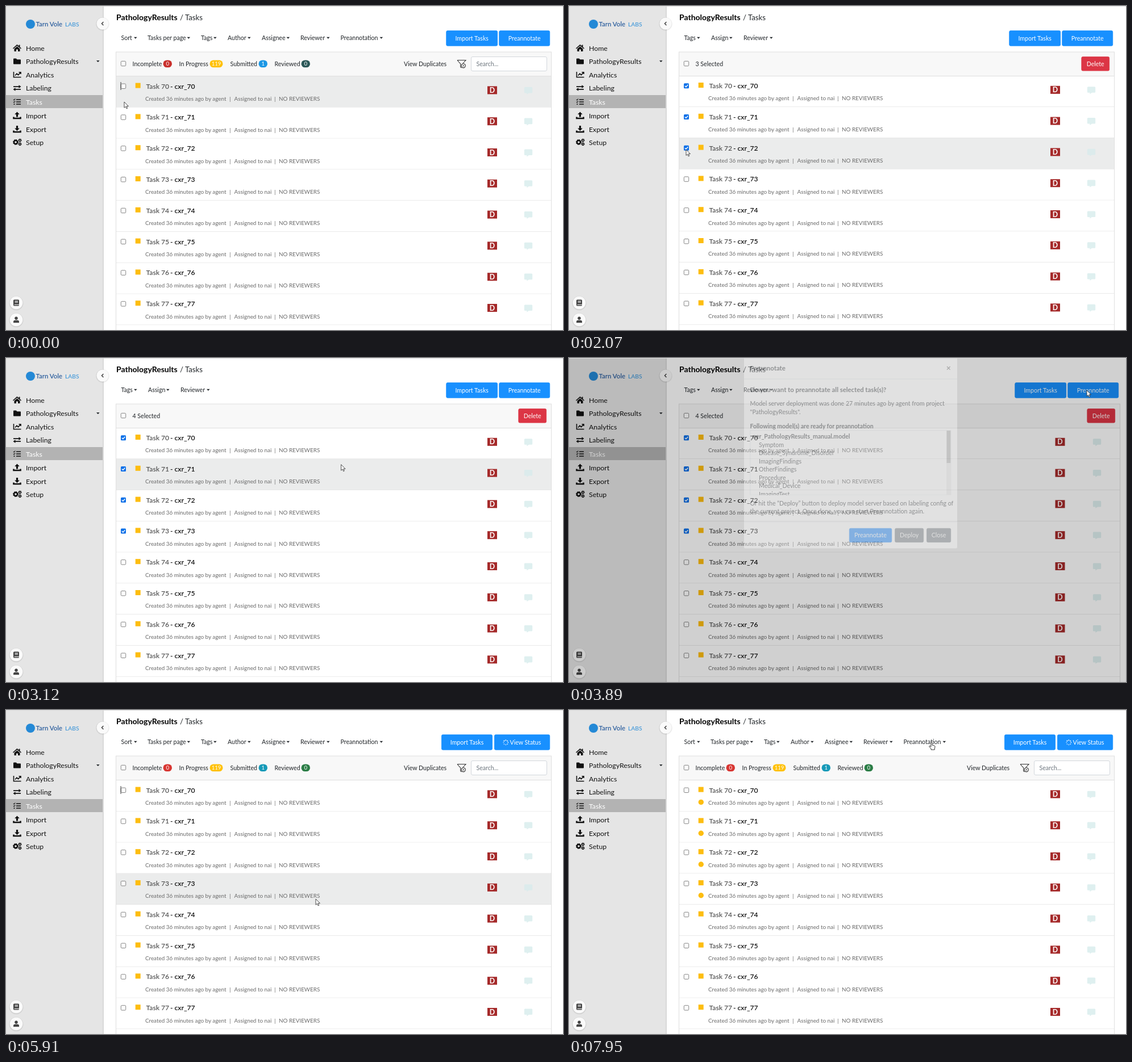
An HTML page that plays this animation: 980 by 571 pixels, repeating every 8000 ms.

```html
<!DOCTYPE html>
<html lang="en">
<head>
<meta charset="utf-8">
<title>Task list</title>
<style>
  html, body { margin: 0; width: 100%; height: 100%; overflow: hidden; background: #fff; }
  svg { display: block; width: 980px; height: 571px; font-family: Lato, sans-serif; }
  text { white-space: pre; }
</style>
</head>
<body>
<svg id="stage" viewBox="0 0 980 571"></svg>
<script>
const LOOP = 8000;
const PROJECT = 'PathologyResults';
const CLICKS = [450, 1120, 1880, 2620];      // one checkbox each
const MODAL_OPEN = 3830, MODAL_CLOSE = 5770, LIST_RELOAD = 5860, DOTS_SHOWN = 6900;
const ROW_H = 54.8;

// time, x, y of the pointer tip
const POINTER = [
  [0, 208, 169], [70, 208, 169], [350, 206, 143], [650, 206, 143], [950, 206, 198],
  [1300, 206, 198], [1600, 206, 253], [2150, 206, 253], [2400, 206, 308], [2700, 206, 308],
  [2900, 400, 255], [3120, 589, 188], [3400, 760, 120], [3720, 911, 57], [4250, 911, 57],
  [4700, 760, 140], [5020, 570, 279], [5090, 561, 304], [5230, 545, 333], [6250, 545, 333],
  [6600, 565, 310], [7000, 576, 272], [7240, 592, 240], [7310, 597, 226], [7650, 632, 84],
  [7850, 638, 57], [8000, 638, 57]
];

const clamp = v => Math.max(0, Math.min(1, v));

function pointerAt(t) {
  const i = Math.max(1, POINTER.findIndex(p => p[0] >= t));
  const [t0, x0, y0] = POINTER[i - 1], [t1, x1, y1] = POINTER[i];
  const k = clamp((t - t0) / (t1 - t0));
  return { x: x0 + (x1 - x0) * k, y: y0 + (y1 - y0) * k };
}

// drawing helpers; text is placed by the middle of its capitals
const text = (x, mid, str, size = 10.6, fill = '#212529', weight = 400, anchor = 'start') =>
  `<text x="${x}" y="${mid + size * 0.36}" font-size="${size}" fill="${fill}" font-weight="${weight}" text-anchor="${anchor}">${str}</text>`;
const rect = (x, y, w, h, fill, r = 0, more = '') =>
  `<rect x="${x}" y="${y}" width="${w}" height="${h}" rx="${r}" fill="${fill}" ${more}/>`;
const circle = (x, y, r, fill, more = '') => `<circle cx="${x}" cy="${y}" r="${r}" fill="${fill}" ${more}/>`;
const path = (d, fill, more = '') => `<path d="${d}" fill="${fill}" ${more}/>`;
const line = (d, color, width = 1) => path(d, 'none', `stroke="${color}" stroke-width="${width}"`);
const at = (x, y, content, more = '') => `<g transform="translate(${x} ${y})" ${more}>${content}</g>`;
const caret = (x, y) => path(`M${x} ${y - 1.5}h5.6l-2.8 3z`, '#212529');
const buttonBox = (x, y, w, h, fill) => rect(x, y, w, h, fill, 2.2, `stroke="${fill}" stroke-width=".8"`);
const button = (x, y, w, h, label, fill) =>
  buttonBox(x, y, w, h, fill) + text(x + w / 2, y + h / 2 + 0.2, label, 10.6, '#fff', 400, 'middle');
const pill = (x, w, label, fill, color = '#fff') =>
  rect(x, 95.5, w, 12.8, fill, 6.4) + text(x + w / 2, 102, label, 9.6, color, 400, 'middle');
const checkbox = (x, y, on) => on
  ? rect(x - 4.5, y - 4.5, 9, 9, '#0b70e8', 1.5) + line(`M${x - 2.6} ${y}l2 2 3.4-4`, '#fff', 1.4)
  : rect(x - 4.2, y - 4.2, 8.4, 8.4, '#fff', 1.5, 'stroke="#767676" stroke-width=".9"');

function gear(x, y, r) {
  return circle(x, y, r * 0.72, 'none', `stroke="#111" stroke-width="${r * 0.6}"`) +
    circle(x, y, r, 'none', `stroke="#111" stroke-width="1.3" stroke-dasharray="${r * 0.393}"`);
}

const tray = line('M-6 2.5V5H6V2.5', '#111', 2.6);
const NAV = [
  ['Home', 74, path('M-7.5 .5L0-6.2 3-3.5V-5.5H5v3.7L7.5.5 6.5 1.5 0-4-6.5 1.5zM-5 1.5L0-2.7 5 1.5V6H1.5V2.5h-3V6H-5z', '#111')],
  [PROJECT, 97.5, path('M-6.5-4q0-1 1-1h3.8L0-3.3h5.5q1 0 1 1V4q0 1-1 1h-11q-1 0-1-1z', '#111')],
  ['Analytics', 121, line('M-6-5V4.5H7M-3.5 1.5L-.5-1.8 2 .5 6-3.8M3-4.3h3.5V-1', '#111', 1.6)],
  ['Labeling', 144.5, line('M-6.5-2.4H4M6.5 2.4H-4', '#111', 1.7) + path('M3-5.2l4 2.8-4 2.8zM-3-.4l-4 2.8 4 2.8z', '#111')],
  ['Tasks', 169, line('M-1.5-4H6.5M-1.5 0H6.5M-1.5 4H6.5', '#111', 1.6) +
    line('M-6.5-4.2l1.2 1.2 2-2.4M-6.5-.2l1.2 1.2 2-2.4', '#111', 1.1) + circle(-5, 4, 1.1, '#111')],
  ['Import', 193, tray + path('M0-6.5l4.3 4.5H1.6V2.5h-3.2V-2h-2.7z', '#111')],
  ['Export', 217, tray + path('M0 3l4.3-4.5H1.6V-6h-3.2v4.5h-2.7z', '#111')],
  ['Setup', 240, gear(-2.5, 0, 4.3) + gear(5, -3.3, 2.4) + gear(5, 3.3, 2.4)]
];

const floating = (x, y, r, icon) => circle(x, y + 0.8, r + 1.2, '#000', 'opacity=".08"') +
  circle(x, y, r, '#fafafa') + at(x, y, icon);

function sidebar() {
  return rect(0, 0, 171, 571, '#e5e5e5') + rect(170.5, 0, 1.2, 571, '#cbcbcb') +
    circle(43, 32, 8, '#2489d6') +
    text(52.5, 32.2, 'Tarn Vole', 11.4, '#2d5f9e', 600) + text(104, 32.2, 'LABS', 10.3, '#2d8fd8') +
    rect(0, 157, 170, 23, '#b3b3b3') +
    NAV.map(([label, y, icon]) => at(19.5, y, icon) +
      text(35, y + 0.2, label, 12.3, label === 'Tasks' ? '#fff' : '#111')).join('') +
    caret(159, 97.5) +
    floating(170, 31, 10.5, line('M1.4-3L-1.6 0l3 3', '#333', 1.3)) +
    floating(18, 523, 11.3, rect(-5, -5.5, 10, 11, '#444', 1.5) + line('M-2.5-2.8H3M-2.5-.8H3M-3.5 3.3H5', '#fff', 1)) +
    floating(18, 553, 11.3, circle(0, -2.8, 2.7, '#444') + path('M-5 5.3V3.6Q-5 .8-2 .8H2Q5 .8 5 3.6V5.3z', '#444'));
}

function toolbar(selecting, reloaded, dx, t) {
  const menus = selecting
    ? [['Tags', 202.5, 225], ['Assign', 250, 282], ['Reviewer', 307, 353]]
    : [['Sort', 202.5, 225], ['Tasks per page', 249, 318.5], ['Tags', 343, 365], ['Author', 390, 425],
       ['Assignee', 450, 493.5], ['Reviewer', 518, 564], ['Preannotation', 588.5, 657.5]];
  let out = text(194, 20, PROJECT, 14, '#000', 700) + text(306, 20, '/ Tasks', 13.2) +
    menus.map(([label, x, cx]) => text(x, 56, label) + caret(cx, 56.3)).join('');
  if (!reloaded) return out + button(774.7 + dx, 43.6, 90, 26.6, 'Import Tasks', '#1890ff') +
    button(867.7 + dx, 43.6, 89, 26.6, 'Preannotate', '#1890ff');
  const turn = Math.floor(t / 125) * 45;
  return out + button(766.4, 43.6, 89.2, 26.6, 'Import Tasks', '#1890ff') + buttonBox(859.4, 43.6, 97.3, 26.6, '#1890ff') +
    text(886.5, 57.1, 'View Status', 10.6, '#fff') +
    at(879.3, 57.3, [...Array(8).keys()].map(i =>
      circle(0, -4, 1.05, '#fff', `transform="rotate(${i * 45 + turn})" opacity="${1 - i * 0.07}"`)).join(''));
}

function panelHeader(count, selecting, reloaded, dx) {
  const frame = rect(193.5, 81, 766 + dx, 42.5, '#f8f8f8', 0, 'stroke="#dfdfdf" stroke-width="1"') + checkbox(206.5, 101.5, false);
  if (selecting) return frame + text(222.5, 101.7, count + ' Selected') + button(901.8 + dx, 89.5, 48.8, 24.6, 'Delete', '#dc3545');
  return frame +
    text(222.5, 101.7, 'Incomplete') + pill(276.5, 15.5, '0', reloaded ? '#d83632' : '#c9302c') +
    text(304.5, 101.7, 'In Progress') + pill(358.5, 23, '119', '#ffc107') +
    text(394.5, 101.7, 'Submitted') + pill(444.5, 15.5, '1', reloaded ? '#179ab8' : '#1b97e5') +
    text(472.5, 101.7, 'Reviewed') + pill(519.5, 15.5, '0', reloaded ? '#2b7d46' : '#2c5858') +
    text(700, 101.7, 'View Duplicates') +
    line('M794 95.5H809L803.5 101.5M794 95.5L799.7 102V107.5L801.5 109', '#333', 1.1) +
    circle(804.8, 105.3, 3.6, '#f8f8f8', 'stroke="#333" stroke-width="1.1"') + line('M803.3 103.8l3 3m0-3l-3 3', '#333', 0.8) +
    rect(818.5, 89.5, 133, 25, '#fff', 2.5, 'stroke="#ced4da" stroke-width=".9"') + text(827.5, 101.8, 'Search...', 10.6, '#6c757d');
}

function row(i, checked, hovered, dotted, dx) {
  const gray = '#6a6a6a';
  return rect(194, 0, 765.5 + dx, ROW_H, hovered ? '#ebecec' : '#fff') +
    rect(194, ROW_H - 0.6, 765.5 + dx, 0.9, '#dedede') +
    checkbox(206.5, 17.5, checked) + rect(227.7, 11.8, 9, 9, '#fdbd10') +
    text(246.5, 17.4, `Task 7${i}`, 12.1, '#555', 600) + text(289, 17.4, `- cxr_7${i}`, 12.1, '#111', 600) +
    text(245, 39.6, 'Created 36 minutes ago by agent', 9.85, gray) + text(393, 39.6, '|', 9.85, gray) +
    text(401.5, 39.6, 'Assigned to nai', 9.85, gray) + text(472, 39.6, '|', 9.85, gray) +
    text(480, 39.6, 'NO REVIEWERS', 9.85, gray) +
    (dotted ? circle(232.3, 38.6, 4.7, '#fdbd10') : '') +
    rect(847 + dx * 0.85, 17.6, 17, 14, '#a52a2a') + text(855.5 + dx * 0.85, 24.7, 'D', 12.3, '#fff', 700, 'middle') +
    at(919 + dx, 25, path('M-7.2-4.5q0-1.5 1.5-1.5H5.7q1.5 0 1.5 1.5V3.1Q7.2 4.6 5.7 4.6H1L-2.7 7V4.6h-3q-1.5 0-1.5-1.5z', hovered ? '#dcebec' : '#dff0f0'));
}

function modal(hot) {
  const labels = ['Symptom', 'Disease_Syndrome_Disorder', 'ImagingFindings', 'OtherFindings', 'Procedure', 'Medical_Device', 'ImagingTest'];
  return rect(308, 20, 375, 336.4, '#fff', 2.5) +
    text(318.5, 38.8, 'Preannotate', 11.4, '#212529', 700) + line('M665 36l5.6 5.6m0-5.6l-5.6 5.6', '#666', 1.3) +
    rect(308, 57.5, 375, 0.9, '#dee2e6') +
    text(318.5, 76.8, 'Do you want to preannotate all selected task(s)?', 11.3, '#212529', 700) +
    text(318.5, 101.2, 'Model server deployment was done 27 minutes ago by agent from project') +
    text(318.5, 115.7, `"${PROJECT}".`) +
    text(318.5, 140.7, 'Following model(s) are ready for preannotation', 10.5, '#212529', 700) +
    '<clipPath id="list"><rect x="318" y="148" width="355" height="114.5"/></clipPath><g clip-path="url(#list)">' +
    rect(318.8, 148.6, 353, 113.6, '#fff', 0, 'stroke="#dee2e6" stroke-width=".9"') +
    text(323, 159.4, `ner_${PROJECT}_manual.model`, 10.5, '#212529', 700) +
    labels.map((label, i) => text(334, 174 + i * 14.45, label)).join('') +
    rect(664, 149, 7.6, 113, '#ececec') + rect(664.5, 149, 6.8, 57, '#adadad') + '</g>' +
    text(318.5, 277, 'Or hit the “Deploy” button to deploy model server based on labeling config of') +
    text(318.5, 291.5, 'the current project. Once done, you can start Preannotation again.') +
    rect(308, 309.3, 375, 0.9, '#dee2e6') +
    button(493.3, 321.2, 74.4, 24.4, 'Preannotate', hot ? '#0069d9' : '#007bff') +
    button(573.6, 321.2, 50, 24.4, 'Deploy', '#6c757d') + button(629.5, 321.2, 42.2, 24.4, 'Close', '#6c757d');
}

const ARROW = path('M0 0V10.4L2.4 8.2 4.1 11.9 5.7 11.2 4.1 7.6H7.4z', '#fff', 'stroke="#222" stroke-width=".8"');
const HAND = path('M-1.1 1a1.1 1.1 0 0 1 2.2 0V5l3.5.8q1.6.4 1.4 2.2L5.2 11v2H-1v-1.8L-4.2 7.5q-.2-1.6 1.2-1.3l1.9 1.6z',
  '#fff', 'stroke="#222" stroke-width=".9"');

function scene(t) {
  const count = t < LIST_RELOAD ? CLICKS.filter(c => t >= c).length : 0;
  const selecting = count > 0, reloaded = t >= LIST_RELOAD;
  const modalUp = t >= MODAL_OPEN && !reloaded;
  const dx = modalUp ? 10 : 0;
  const pointer = pointerAt(t), trail = pointerAt(Math.max(0, t - 70));
  const top = selecting ? 123.2 : 123.8;
  const hovered = modalUp ? -1 : Math.floor((trail.y - top) / ROW_H);
  const overButton = modalUp ? pointer.y > 321 : pointer.y > 46 && pointer.y < 70;

  let out = rect(0, 0, 980, 571, '#fff') + toolbar(selecting, reloaded, dx, t);
  for (let i = 0; i < 9; i++)
    out += at(0, top + i * ROW_H, row(i, i < count, i === hovered, t >= DOTS_SHOWN && i < 4, dx));
  out += panelHeader(count, selecting, reloaded, dx) +
    line(`M193.5 123V571M${959.5 + dx} 123V571`, '#dfdfdf');
  const blinkStart = reloaded ? LIST_RELOAD - 10 : 0;
  if (!selecting && (t - blinkStart) % 1060 < 530) out += rect(201.6, 134, 0.9, 14, '#222');
  out += sidebar();

  if (modalUp) {
    const rise = clamp((t - MODAL_OPEN) / 300);
    const shown = (1 - (1 - rise) ** 2) * (1 - clamp((t - MODAL_CLOSE) / 110));
    out += rect(0, 0, 980, 571, '#000', 0, `opacity="${shown * 0.5}"`) +
      at(0, (shown - 1) * 33, modal(overButton), `opacity="${shown}"`);
  }
  // the window edge stays undimmed
  return out + rect(0, 0, 980, 1, '#dedede') + at(pointer.x, pointer.y, overButton ? HAND : ARROW);
}

const stage = document.getElementById('stage');
let shownScene = '';
function tick() {
  const next = scene(performance.now() % LOOP);
  if (next !== shownScene) stage.innerHTML = shownScene = next;
  requestAnimationFrame(tick);
}
tick();
</script>
</body>
</html>
```
